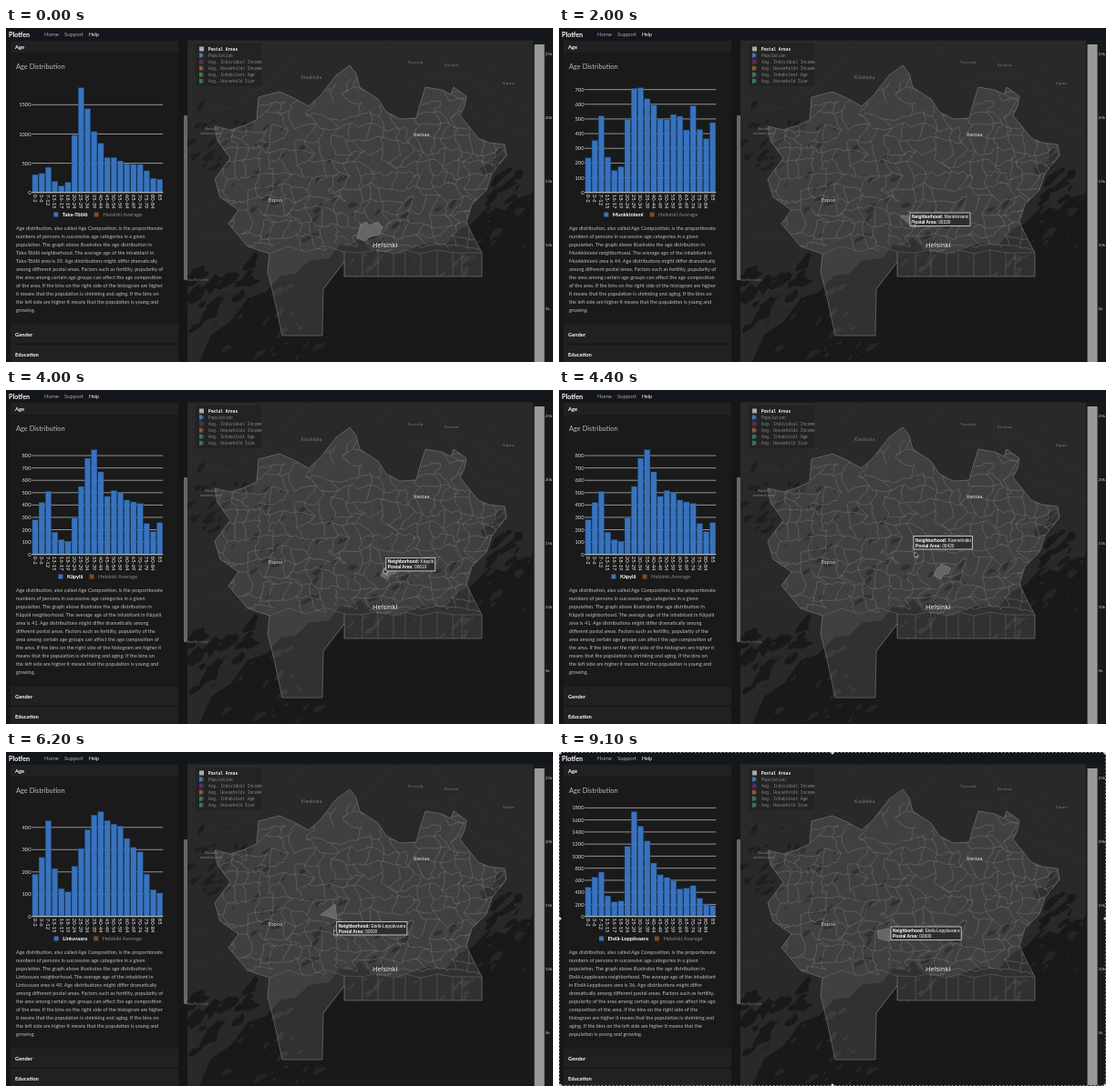
An HTML page for the animation above (9.2 s loop, 600 by 367 pixels).

```html
<!DOCTYPE html>
<html lang="en">
<head>
<meta charset="utf-8">
<title>Plotfen</title>
<style>
  html, body { margin: 0; width: 100%; height: 100%; overflow: hidden; background: #191a1a; }
  svg { display: block; }
  text { font-family: Lato, sans-serif; fill: #fff; white-space: pre; }
  .place { font-family: "Noto Sans", sans-serif; }
  .mono { font-family: "Liberation Mono", monospace; }
  .tip { font-family: "Liberation Sans", Arial, sans-serif; font-size: 4.8px; }
  .bold { font-weight: bold; }
</style>
</head>
<body>
<svg id="stage" width="600" height="367" viewBox="0 0 600 367"></svg>
<script>
const LOOP = 9200;
const BLUE = '#3873be';
const stage = document.getElementById('stage');

function el(parent, tag, attrs = {}, content) {
  const node = document.createElementNS('http://www.w3.org/2000/svg', tag);
  for (const key in attrs) node.setAttribute(key, attrs[key]);
  if (content !== undefined) node.textContent = content;
  return parent.appendChild(node);
}
const group = (parent, attrs) => el(parent, 'g', attrs);
const rect = (parent, x, y, width, height, fill, more) =>
  el(parent, 'rect', { x, y, width, height, fill, ...more });
const label = (parent, x, y, size, fill, content, more) =>
  el(parent, 'text', { x, y, 'font-size': size, style: `fill:${fill}`, ...more }, content);
const line = (parent, d, stroke, width, more) =>
  el(parent, 'path', { d, stroke, 'stroke-width': width, fill: 'none', ...more });

function seeded(seed) {
  return () => {
    seed = (seed * 1664525 + 1013904223) >>> 0;
    return seed / 4294967296;
  };
}

// ---------- map ----------
const REGION = 'M303 338L347 338L348 287L371 257L371 273L522 273L522 247L513 230L505 213L511 194L527 178L533 160L549 140L547 128L530 126L518 121L506 106L498 96L503 86L505 75L491 65L488 73L478 68L460 65L454 84L450 99L432 100L417 92L408 78L388 65L384 50L377 41L362 52L345 74L332 86L316 77L300 70L277 76L275 101L262 107L246 112L229 108L232 124L246 143L229 166L235 186L255 200L244 215L265 240L289 248L287 268L294 296Z';
const SEA = 'M600 150L582 165L574 190L560 186L548 200L530 195L512 214L496 222L482 239L462 236L440 244L426 248L412 239L400 244L388 230L378 240L366 238L355 253L332 256L318 270L302 272L285 290L265 297L247 322L225 337L212 367L600 367Z';

function blobs(parent, seed, count, [x, y, w, h], fill, size) {
  const rnd = seeded(seed);
  for (let i = 0; i < count; i++) {
    const cx = x + w * rnd(), cy = y + h * rnd(), r = size * (0.35 + rnd());
    let d = '';
    for (let k = 0; k < 8; k++) {
      const a = k * Math.PI / 4, q = r * (0.5 + 0.9 * rnd());
      d += `${k ? 'L' : 'M'}${(q * 1.6 * Math.cos(a)).toFixed(1)} ${(q * 0.65 * Math.sin(a)).toFixed(1)}`;
    }
    el(parent, 'path', { d: d + 'Z', fill, transform: `translate(${cx} ${cy}) rotate(${-55 + 30 * rnd()})` });
  }
}

// Irregular district borders from a jittered lattice with bent edges.
function districts(parent) {
  const rnd = seeded(41), nodes = [], cols = 25, rows = 16;
  for (let j = 0; j < rows; j++)
    for (let i = 0; i < cols; i++)
      nodes.push([220 + i * 13.6 + (j % 2) * 6.5 + (rnd() - 0.5) * 11, 42 + j * 13.3 + (rnd() - 0.5) * 10]);
  let d = '';
  const edge = (a, b, keep) => {
    const bend = () => (rnd() - 0.5) * 5;
    const [p, q] = [nodes[a], nodes[b]];
    const mid = [1 / 3, 2 / 3].map(f =>
      `L${(p[0] + (q[0] - p[0]) * f + bend()).toFixed(1)} ${(p[1] + (q[1] - p[1]) * f + bend()).toFixed(1)}`);
    if (rnd() < keep && Math.max(p[1], q[1]) < 248)
      d += `M${p[0].toFixed(1)} ${p[1].toFixed(1)}${mid.join('')}L${q[0].toFixed(1)} ${q[1].toFixed(1)}`;
  };
  for (let j = 0; j < rows; j++)
    for (let i = 0; i < cols; i++) {
      const n = j * cols + i, keep = j < 4 ? 0.5 : 0.84;
      if (i < cols - 1) edge(n, n + 1, keep);
      if (j < rows - 1) edge(n, n + cols, keep);
    }
  line(parent, d, '#777', 0.5);
}

const map = group(stage);
rect(map, 199, 13, 380, 354, '#292929');
const clip = el(el(stage, 'defs'), 'clipPath', { id: 'region' });
el(clip, 'path', { d: REGION });

line(map, 'M199 75L240 90L290 60L330 14M300 62L345 88L400 40L430 14M440 60L500 50L578 95M470 14L490 60L520 100L578 120M199 205L235 190M199 235L240 225L262 240M540 30L520 70L550 110', '#343434', 0.6);
blobs(map, 5, 20, [202, 75, 65, 105], '#1d1e1e', 4);
el(map, 'path', { d: SEA, fill: '#181919' });
blobs(map, 8, 22, [528, 135, 50, 75], '#181919', 6);
blobs(map, 12, 20, [202, 255, 75, 80], '#181919', 8);
blobs(map, 21, 24, [225, 275, 125, 88], '#252525', 4);
blobs(map, 33, 18, [375, 244, 145, 30], '#282828', 3.5);
blobs(map, 17, 10, [520, 195, 58, 50], '#252525', 4);
el(map, 'path', { d: REGION, fill: '#fff', 'fill-opacity': 0.105 });
const land = group(map, { 'clip-path': 'url(#region)' });
blobs(land, 71, 26, [235, 105, 140, 130], '#303030', 4);
blobs(land, 77, 14, [375, 190, 120, 50], '#303030', 3.5);
line(land, 'M245 190L300 196L350 183L400 174L460 160L540 145M285 245L330 215L380 200L400 226M400 230L408 180L398 110L380 50M415 225L450 175L475 110L500 70M330 200L345 145L335 90', '#4a4a4a', 0.7);
districts(land);
line(land, 'M289 248L310 240L330 246L350 239L371 246L391 247L408 243L425 248L438 244L455 248L473 244L490 247L522 247M371 246V273M391 247V273M408 243V273M425 248V273M438 244V273M455 248V273M473 244V273M490 247V273M500 247V273M348 287L371 257V246', '#6c6c6c', 0.5);
line(map, REGION, '#808080', 0.6);

const AREAS = {
  taka: 'M389 216L395 213L399 217L408 213L413 219L410 227L400 229L393 234L385 231Z',
  munk: 'M374 206L382 206L390 210L386 217L380 212Z',
  kapy: 'M411 204L414 197L420 191L430 196L427 202L421 203L419 208Z',
  kann: 'M382 162L390 160L396 166L398 176L389 182L383 176Z',
  lint: 'M345 179L361 167L363 184L354 181Z',
  etel: 'M349 196L362 194L366 200L362 208L350 205Z'
};
const highlight = el(map, 'path', { fill: '#6c6c6c', 'fill-opacity': 0.85, stroke: '#8c8c8c', 'stroke-width': 0.5 });

function place(x, y, size, fill, content, more) {
  label(map, x, y, size, fill, content, { class: 'place', ...more });
}
place(402, 241, 7.4, '#eee', 'Helsinki');
place(406, 245.5, 3, '#888', 'Helsingfors');
place(447, 119, 5.4, '#ddd', 'Vantaa');
place(288, 191, 5.4, '#ddd', 'Espoo');
place(324, 56, 4.4, '#808080', 'Klaukkala', { 'letter-spacing': 0.3 });
place(440, 39, 4.3, '#808080', 'Tuusula', { 'letter-spacing': 0.3 });
place(481, 42, 4.3, '#808080', 'Kerava', { 'letter-spacing': 0.3 });
place(545, 62, 4.3, '#808080', 'Sipoo', { 'letter-spacing': 0.2 });
place(218, 112, 3.8, '#888', 'Nuuksio');
place(213, 117, 3.8, '#888', 'national park');
place(199, 278, 3.8, '#777', 'kko/Kyrkslätt');

rect(map, 208, 17, 72, 47, '#000', { 'fill-opacity': 0.15 });
[['Postal Areas', '#aaa'], ['Population', '#3f78b8'], ['Avg. Individual Income', '#5c2a62'],
 ['Avg. Households Income', '#96582c'], ['Avg. Inhabitant Age', '#347a5a'], ['Avg. Household Size', '#347a5a']]
  .forEach(([name, color], i) => {
    const y = 20.5 + i * 7.05;
    rect(map, 212, y, 5, 5, i ? '#383838' : color);
    if (i) el(map, 'path', { d: `M212 ${y}L214 ${y}L216.5 ${y + 2.5}L214 ${y + 5}L212 ${y + 5}Z`, fill: color });
    label(map, 222, y + 4, 4.46, i ? '#8c8c8c' : '#fff', name, { class: i ? 'mono' : 'mono bold' });
  });

rect(stage, 578, 13, 22, 354, '#181919');
rect(stage, 579.6, 18, 11, 349, '#999');
for (let k = 0; k < 5; k++)
  label(stage, 591.5, 30 + k * 70, 4.6, '#ccc', `${25 - 5 * k}k`);

// ---------- frame and side panel ----------
rect(stage, 0, 0, 600, 13.5, '#13161b');
rect(stage, 0, 13.5, 199, 354, '#161616');
rect(stage, 5, 14, 184, 312, '#1a1a1a');
for (const [y, h] of [[14, 13], [326, 20.5], [348, 19]])
  rect(stage, 5, y, 184, h, '#212121');
rect(stage, 195, 96, 4, 181, '#676767', { rx: 1 });
label(stage, 3, 9.5, 7.2, '#fff', 'Plotfen', { class: 'bold' });
label(stage, 42, 9, 6, '#aaa', 'Home');
label(stage, 64, 9, 6, '#aaa', 'Support');
label(stage, 91, 9, 5.3, '#fff', 'Help');
[['Age', 22.7], ['Gender', 339], ['Education', 360.7]]
  .forEach(([name, y]) => label(stage, 10, y, 5.8, '#fff', name, { class: 'bold' }));
label(stage, 11, 44.8, 7.45, '#bbb', 'Age Distribution');

// ---------- chart ----------
const INTRO = 'Age distribution, also called Age Composition, is the proportionate|numbers of persons in successive age categories in a given|population. The graph above illustrates the age distribution in|';
const ENDING = '|the left side are higher it means that the population is young and|growing.';
const WRAPS = {
  medium: '# neighborhood. The average age of the inhabitant in|# area is @. Age distributions might differ dramatically|among different postal areas. Factors such as fertility, popularity of|the area among certain age groups can affect the age composition|of the area. If the bins on the right side of the histogram are higher|it means that the population is shrinking and aging. If the bins on' + ENDING,
  short: '# neighborhood. The average age of the inhabitant in #|area is @. Age distributions might differ dramatically among|different postal areas. Factors such as fertility, popularity of the|area among certain age groups can affect the age composition of|the area. If the bins on the right side of the histogram are higher it|means that the population is shrinking and aging. If the bins on' + ENDING,
  long: '# neighborhood. The average age of the inhabitant|in # area is @. Age distributions might differ|dramatically among different postal areas. Factors such as fertility,|popularity of the area among certain age groups can affect the age|composition of the area. If the bins on the right side of the|histogram are higher it means that the population is shrinking and|aging. If the bins on the left side are higher it means that the|population is young and growing.'
};
const CHARTS = {
  taka: { name: 'Taka-Töölö', age: 39, step: 500, wrap: 'medium',
    bins: [305, 325, 430, 190, 110, 175, 980, 1790, 1430, 1040, 840, 597, 597, 540, 490, 480, 478, 370, 240, 225] },
  munk: { name: 'Munkkiniemi', age: 44, step: 100, wrap: 'medium',
    bins: [235, 353, 520, 240, 150, 175, 495, 708, 712, 637, 595, 500, 495, 530, 518, 425, 588, 428, 365, 475] },
  kapy: { name: 'Käpylä', age: 41, step: 100, wrap: 'short',
    bins: [280, 420, 510, 180, 120, 105, 295, 550, 778, 847, 668, 470, 517, 500, 440, 425, 412, 250, 185, 258] },
  kann: { name: 'Kannelmäki', age: 42, step: 200, wrap: 'medium',
    bins: [375, 500, 695, 310, 195, 280, 850, 1330, 1215, 1045, 865, 715, 815, 825, 790, 790, 845, 475, 340, 350] },
  lint: { name: 'Lintuvaara', age: 40, step: 100, wrap: 'medium',
    bins: [190, 265, 430, 215, 125, 110, 225, 305, 390, 455, 470, 430, 415, 405, 350, 310, 290, 190, 120, 105] },
  etel: { name: 'Etelä-Leppävaara', age: 36, step: 200, wrap: 'long',
    bins: [485, 650, 735, 340, 240, 255, 1160, 1735, 1495, 1250, 885, 690, 645, 595, 455, 470, 510, 300, 200, 180] }
};
const BANDS = ['0-2', '3-6', '7-12', '13-15', '16-17', '18-19'];
for (let a = 20; a < 85; a += 5) BANDS.push(`${a}-${a + 4}`);
BANDS.push('85');

function buildChart({ name, age, step, wrap, bins }) {
  const g = group(stage, { visibility: 'hidden' });
  const base = 180.7, left = 28.4, pitch = 7.19, scale = 115 / Math.max(...bins);
  for (let v = 0; v * scale < 120; v += step) {
    const y = base - v * scale;
    line(g, `M${left} ${y}H172.2`, '#c8c8c8', 0.7);
    label(g, 27.6, y + 2.1, 5.8, '#ddd', v, { 'text-anchor': 'end' });
  }
  bins.forEach((v, i) => {
    const x = left + i * pitch, h = v * scale;
    rect(g, x + 0.5, base - h, pitch - 0.9, h, BLUE, { stroke: '#1d416e', 'stroke-width': 0.4 });
    label(g, 0, 0, 5.8, '#eee', BANDS[i], { transform: `translate(${x + 1.5} 182.8) rotate(90)` });
  });
  line(g, `M${left} ${base}H172.2`, '#ddd', 0.8);

  const title = label(g, 0, 207.2, 5.8, '#fff', name, { class: 'bold' });
  const average = label(g, 0, 207.2, 5.95, '#8c8c8c', 'Helsinki Average');
  const titleWidth = title.getComputedTextLength();
  const start = 100.8 - (titleWidth + average.getComputedTextLength() + 26) / 2;
  rect(g, start, 202.5, 5, 5, BLUE);
  title.setAttribute('x', start + 9.5);
  rect(g, start + titleWidth + 16.5, 202.5, 5, 5, '#804a24');
  average.setAttribute('x', start + titleWidth + 26);

  (INTRO + WRAPS[wrap]).replaceAll('#', name).replace('@', age).split('|')
    .forEach((row, i) => label(g, 11, 222 + i * 8.96, 5.55, '#bdbdbd', row));
  return g;
}
const charts = {};
for (const key in CHARTS) charts[key] = buildChart(CHARTS[key]);

// ---------- pointer, tooltip, capture outline ----------
const tip = group(stage);
const tipBox = rect(tip, 0, 0, 60, 14.5, '#2e2e2e', { stroke: '#ddd', 'stroke-width': 0.8 });
function tipRow(y, heading) {
  const row = el(tip, 'text', { x: 2, y, class: 'tip' });
  el(row, 'tspan', { class: 'bold' }, heading);
  return [row, el(row, 'tspan')];
}
const [nameRow, tipName] = tipRow(6, 'Neighborhood:');
const [, tipCode] = tipRow(12, 'Postal Area:');
const cursor = el(stage, 'path', { d: 'M0 0L0 6L1.5 4.7L2.5 7L3.5 6.6L2.5 4.3L4.4 4.3Z', fill: '#111', stroke: '#fff', 'stroke-width': 0.5 });

const outline = group(stage);
rect(outline, 0.5, 0.5, 599, 366, 'none', { stroke: '#111', 'stroke-width': 1 });
rect(outline, 0.5, 0.5, 599, 366, 'none', { stroke: '#999', 'stroke-width': 1, 'stroke-dasharray': '2 2' });
for (const [cx, cy] of [[1, 1], [300, 1], [599, 1], [1, 183], [599, 183], [1, 366], [300, 366], [599, 366]])
  el(outline, 'circle', { cx, cy, r: 1.6, fill: '#ddd' });

// ---------- timeline ----------
const SHOWN = [[0, 'taka'], [2000, 'munk'], [2800, 'taka'], [3900, 'kapy'], [5000, 'kann'], [6000, 'lint'], [6700, 'etel']];
const PICKED = [[0, 'taka'], [1700, 'munk'], [2600, 'taka'], [3600, 'kapy'], [4800, 'kann'], [5700, 'lint'], [6500, 'etel']];
// time, area, postal code, offset from the pointer
const TIPS = [
  [0], [500, 'Kamppi', '00100', 4, -14], [700, 'Taka-Töölö', '00250', 4, -10],
  [900, 'Munkkiniemi', '00330', -2, -9], [2300, 'Taka-Töölö', '00250', 4, -9],
  [3000, 'Pohjois-Meilahti', '00270', 3, -5], [3400, 'Käpylä', '00610', 2, -12],
  [4100, 'Kannelmäki', '00420', -1, -17.5], [5700, 'Lintuvaara', '02660', 6, -8],
  [6200, 'Etelä-Leppävaara', '02600', 3, -9]
];
const PATH = [
  [100, 432, 320], [600, 404, 236], [900, 388, 213], [1000, 387, 212], [2000, 387, 212],
  [2600, 400, 222], [2800, 400, 222], [3100, 397, 213], [3700, 421, 201], [3900, 421, 201],
  [4400, 390, 178], [5100, 390, 178], [5200, 385, 178], [5600, 385, 178], [5700, 356, 179],
  [5900, 356, 179], [6300, 361, 201], [8300, 361, 201], [8500, 352, 347]
];
const LEAVES = 8300;

const at = (table, t) => table.findLast(row => row[0] <= t) || table[0];
function pointer(t) {
  const next = PATH.findIndex(p => p[0] > t);
  if (next <= 0) return PATH.at(next).slice(1);
  const [a, b] = [PATH[next - 1], PATH[next]];
  const f = (t - a[0]) / (b[0] - a[0]);
  return [a[1] + (b[1] - a[1]) * f, a[2] + (b[2] - a[2]) * f];
}
const show = (node, on) => node.setAttribute('visibility', on ? 'visible' : 'hidden');

function render(t) {
  const shown = at(SHOWN, t)[1];
  for (const key in charts) show(charts[key], key === shown);
  highlight.setAttribute('d', AREAS[at(PICKED, t)[1]]);

  const [x, y] = pointer(t);
  cursor.setAttribute('transform', `translate(${x} ${y})`);
  show(cursor, t >= 100 && t < 8600);

  const [, name, code, dx, dy] = at(TIPS, t);
  show(tip, name);
  if (name) {
    const [px, py] = pointer(Math.min(t, LEAVES));
    tipName.textContent = ' ' + name;
    tipCode.textContent = ' ' + code;
    tipBox.setAttribute('width', nameRow.getComputedTextLength() + 3.6);
    tip.setAttribute('transform', `translate(${px + dx} ${py + dy})`);
  }
  show(outline, t >= 7700);
}

const began = performance.now();
let last = -1;
function tick() {
  const t = Math.floor((performance.now() - began) % LOOP / 100) * 100;
  if (t !== last) render(last = t);
  requestAnimationFrame(tick);
}
tick();
</script>
</body>
</html>
```
